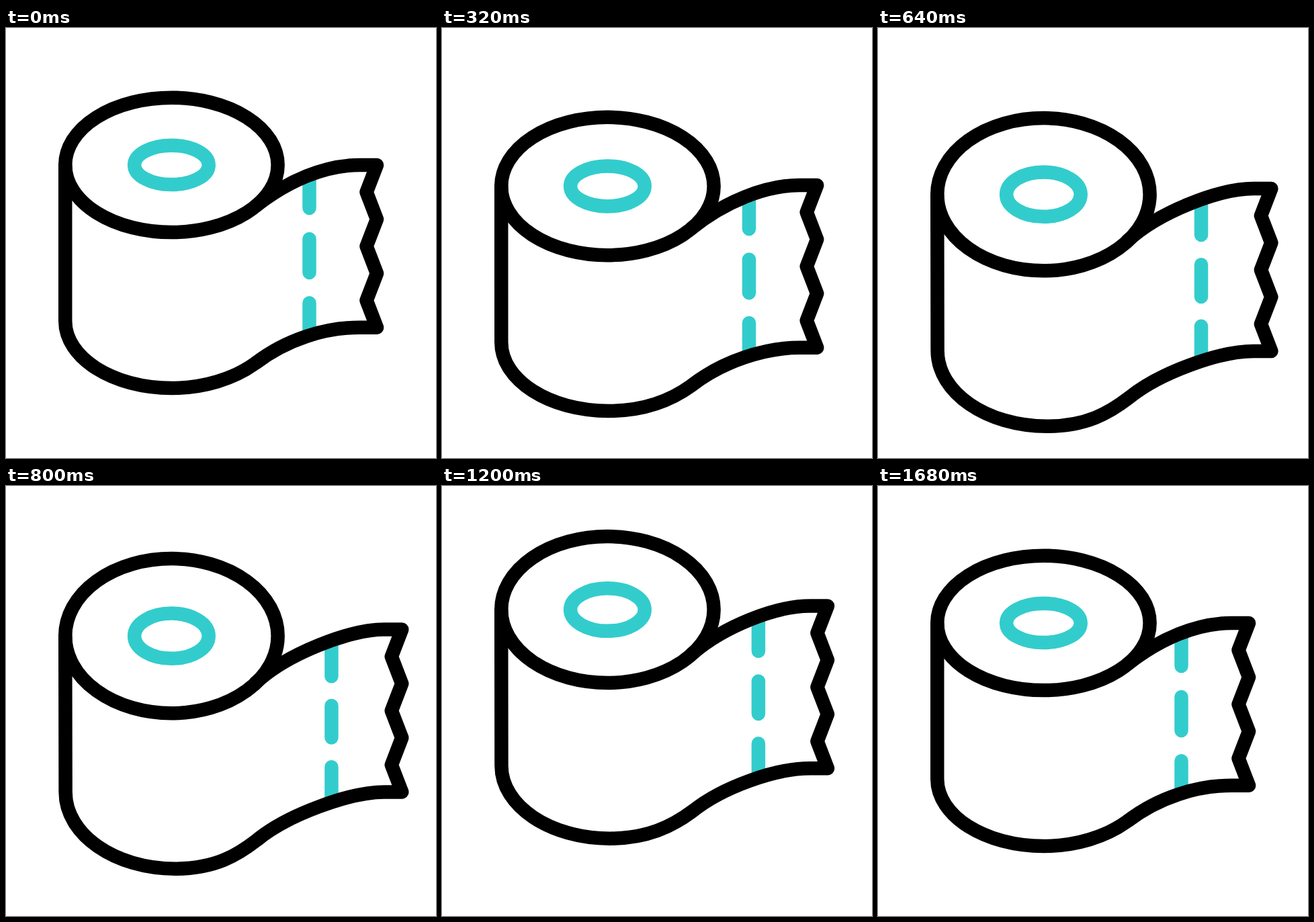
Write an HTML page that moves like this. It is 640 by 640 pixels and loops after 1720 ms.

```html
<!DOCTYPE html>
<html lang="en">
<head>
<meta charset="utf-8">
<title>Paper roll</title>
<style>
  html, body { margin: 0; width: 100%; height: 100%; overflow: hidden; background: #fff; }
  svg { display: block; width: 100%; height: 100%; }
  svg * { fill: none; stroke: #000; stroke-width: 20.5; stroke-linecap: round; stroke-linejoin: round; }
  .accent { stroke: #3cc; }
</style>
</head>
<body>
<svg viewBox="0 0 640 640">
  <g id="roll">
    <path id="dashes" class="accent"/>
    <ellipse id="core" class="accent" cx="246.4" rx="55.3"/>
    <path id="sheet"/>
    <ellipse id="top" cx="246.4" rx="158.2"/>
  </g>
</svg>
<script>
const LOOP = 1720, STEP = 40;
const $ = id => document.getElementById(id);
const roll = $('roll'), dashes = $('dashes'), core = $('core'), sheet = $('sheet'), rim = $('top');

// Cubic easing with flat ends; a and b are the handles' x positions.
function ease(x, a, b) {
  if (x <= 0) return 0;
  if (x >= 1) return 1;
  let lo = 0, hi = 1, s;
  for (let i = 0; i < 24; i++) {
    s = (lo + hi) / 2;
    const u = 1 - s;
    if (3 * u * u * s * a + 3 * u * s * s * b + s * s * s < x) lo = s; else hi = s;
  }
  return s * s * (3 - 2 * s);
}

// Vertical bounce: start, end, from, to, handles
const BOUNCE = [
  [0, 510, 0, 41.5, 0.6, 0.468],
  [510, 1075, 41.5, -30.7, 0.46, 0.67],
  [1075, 1685, -30.7, 0, 0.28, 0.45]
];

function bounce(t) {
  const k = BOUNCE.find(k => t < k[1]);
  if (!k) return 0;
  const [start, end, from, to, a, b] = k;
  return from + (to - from) * ease((t - start) / (end - start), a, b);
}

const stretch = t => ease(1 - Math.abs(t - 850) / 850, 0.68, 0.465);

function draw(t) {
  const m = stretch(t);
  const mix = (a, b) => (a + (b - a) * m).toFixed(2);
  const pt = (x0, y0, x1, y1) => mix(x0, x1) + ' ' + mix(y0, y1) + ' ';

  roll.setAttribute('transform', `translate(0 ${bounce(t).toFixed(2)})`);

  for (const [el, r0, r1] of [[rim, 100.2, 115.2], [core, 29.2, 33.6]]) {
    el.setAttribute('cy', mix(203.9, 213.6));
    el.setAttribute('ry', mix(r0, r1));
  }

  let tear = '';
  for (let i = 0; i < 7; i++) {
    const x = i % 2 ? 536.5 : 552, y = 204 + i * 40.3;
    tear += 'L' + pt(x, y, x + 37.4, y);
  }

  sheet.setAttribute('d',
    'M' + pt(88.2, 204, 88.2, 214) +
    'L' + pt(88.2, 436, 88.6, 446.3) +
    'C' + pt(88.2, 491, 88.6, 509.3) + pt(159, 536, 162, 560.2) + pt(247, 536, 252, 560.2) +
    'C' + pt(295, 536, 312, 560.2) + pt(339, 522, 345, 539.5) + pt(371, 499, 374, 517) +
    'C' + pt(418, 463, 418, 480.5) + pt(475, 445.8, 512, 445.8) + pt(526, 445.8, 563, 445.8) +
    'L' + pt(552, 445.8, 589.4, 445.8) +
    'M' + pt(371, 265.5, 371, 284) +
    'C' + pt(420, 227, 418, 239.8) + pt(475, 204, 512, 204) + pt(526, 204, 563, 204) + tear);

  const x = mix(451.5, 484.6);
  const dash = (a0, b0, a1, b1) => `M${x} ${mix(a0, a1)}V${mix(b0, b1)}`;
  dashes.setAttribute('d',
    dash(220, 268, 225, 273.6) + dash(314, 364, 317.5, 365) + dash(409.2, 456, 408.6, 458.5));
}

const begin = performance.now();
function tick() {
  const t = (performance.now() - begin) % LOOP;
  draw(Math.floor(t / STEP) * STEP);
  requestAnimationFrame(tick);
}
tick();
</script>
</body>
</html>
```
